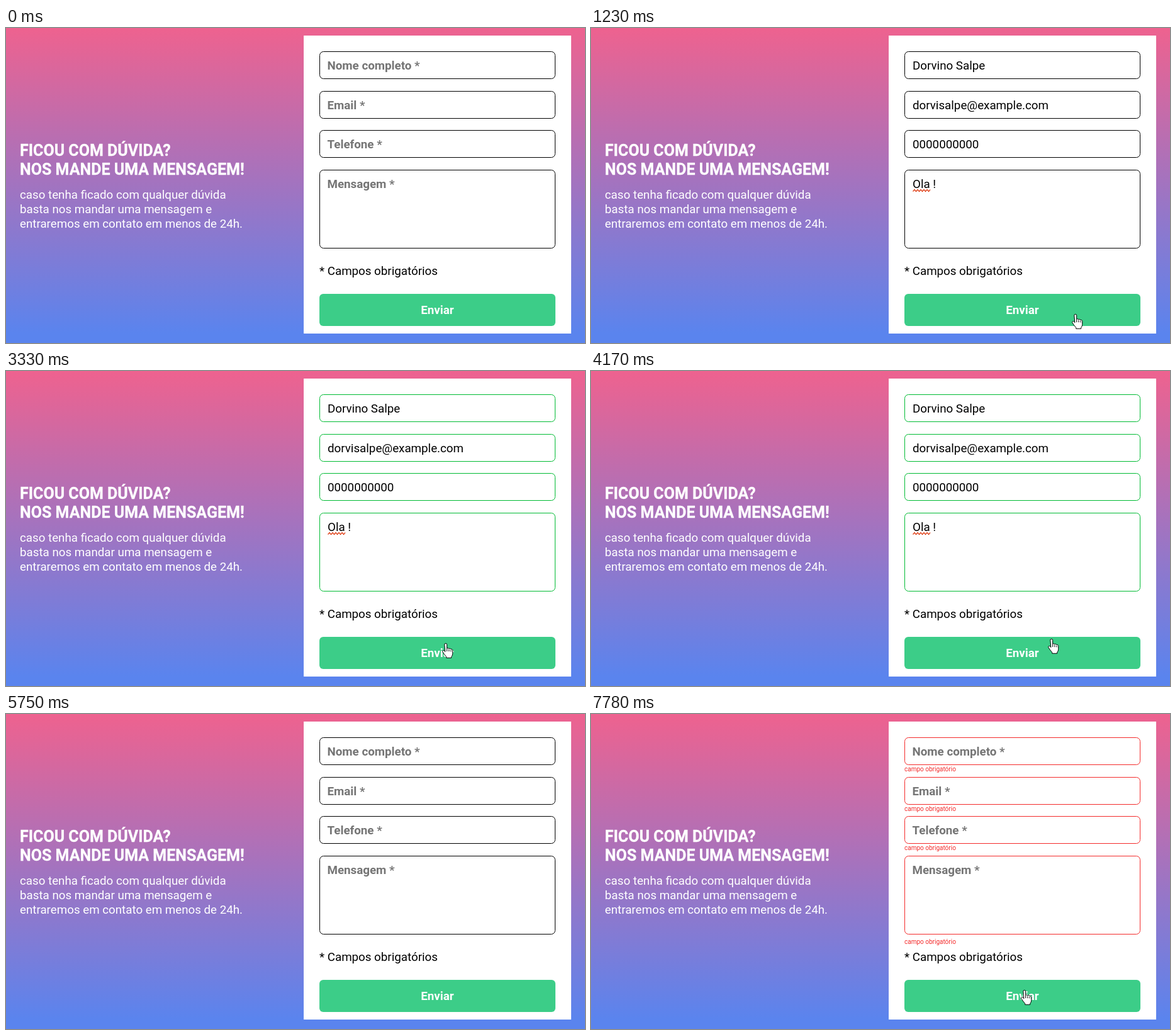
Animation of 920 by 500 pixels, one loop 8000 ms. Source, as an HTML page:

```html
<!DOCTYPE html>
<html lang="pt-BR">
<head>
<meta charset="utf-8">
<title>Formulário de contato</title>
<style>
html, body { margin: 0; width: 920px; height: 500px; overflow: hidden; }
svg { display: block; font: 18.75px Roboto, sans-serif; }
.bold { font-weight: 700; }
.title { font-size: 25px; font-weight: 700; stroke: #fff; stroke-width: .3; }
.hint { font-weight: 700; fill: #757575; }
.error { font-size: 10px; fill: #f42a2a; }
.box { fill: none; stroke: #000; }
.valid .box { stroke: #0b3; }
.invalid .box { stroke: #f42a2a; }
.value, .error { visibility: hidden; }
.filled .value, .valid .value, .invalid .error { visibility: visible; }
.filled .hint, .valid .hint { visibility: hidden; }
.cursor { fill: #fff; stroke: #000; stroke-linejoin: round; }
</style>
</head>
<body>
<svg width="920" height="500" viewBox="0 0 920 500">
  <defs>
    <linearGradient id="sky" x2="0" y2="1">
      <stop stop-color="#ee628f"/>
      <stop offset=".97" stop-color="#5a84ee"/>
    </linearGradient>
  </defs>
  <rect width="920" height="500" fill="url(#sky)"/>
  <g fill="#fff">
    <text class="title" x="22" y="203">FICOU COM DÚVIDA?</text>
    <text class="title" x="22" y="233">NOS MANDE UMA MENSAGEM!</text>
    <text x="22" y="271">caso tenha ficado com qualquer dúvida</text>
    <text x="22" y="294">basta nos mandar uma mensagem e</text>
    <text x="22" y="317">entraremos em contato em menos de 24h.</text>
  </g>
  <rect x="473" y="12" width="425" height="473" fill="#fff"/>
  <g id="form"></g>
  <text x="498" y="392">* Campos obrigatórios</text>
  <rect x="498" y="422" width="375" height="51" rx="6" fill="#3ccd88"/>
  <text class="bold" x="685.5" y="454" fill="#fff" text-anchor="middle">Enviar</text>
  <g id="pointer">
    <g id="hand" class="cursor">
      <path d="M4.8 2.5a1.9 1.9 0 0 1 3.8 0v6.2a1.8 1.8 0 0 1 3.2.6 1.8 1.8 0 0 1 3.2.8 1.7 1.7 0 0 1 2.7 1.5v5q0 3-2 5.2v1.7h-8v-1.7q-3.2-3.4-6-8a1.8 1.8 0 0 1 2.4-2l1.7 2z" transform="translate(-6 -.2)"/>
      <path d="M2.7 8.5v4.5M5.9 9.8v3.4M9 10.8v2.6" fill="none"/>
    </g>
    <path id="arrow" class="cursor" d="M.5 .5V16.5L4.3 13 6.8 18.5 9.3 17.4 6.9 12H11.5Z"/>
    <path id="beam" d="M-3.5-8.5h3l.5.5.5-.5h3M0-8V8M-3.5 8.5h3l.5-.5.5.5h3" fill="none" stroke="#000"/>
    <circle id="click" r="12" fill="#ff0" fill-opacity=".47"/>
  </g>
</svg>
<script>
const LOOP = 8000, STEP = 70, PITCH = 62.6;
const $ = id => document.getElementById(id);

function field(label, value, i, height = 44, gap = 10) {
  const y = Math.round(37 + i * PITCH);
  return `
    <rect class="box" x="498.5" y="${y + .5}" width="374" height="${height - 1}" rx="6"/>
    <text class="hint" x="510.5" y="${y + 29}">${label} *</text>
    <text class="value" x="511" y="${y + 29}">${value}</text>
    <text class="error" x="498" y="${y + height + gap}">campo obrigatório</text>`;
}

const zigzag = Array.from({ length: 12 }, (_, i) => [511.5 + i * 2.5, i % 2 ? 256.5 : 259.5]);
$('form').innerHTML =
  field('Nome completo', 'Dorvino Salpe', 0) +
  field('Email', 'dorvisalpe@example.com', 1) +
  field('Telefone', '0000000000', 2) +
  field('Mensagem', 'Ola !', 3, 125, 15) +
  `<polyline class="value" points="${zigzag}" fill="none" stroke="#e0431b" stroke-width="1.2"/>`;

function formState(t) {
  if (t < 500) return '';
  if (t < 2920) return 'filled';
  if (t < 5750) return 'valid';
  return t < 7780 ? '' : 'invalid';
}

// pointer moves: start, end and the three points of a quadratic curve
const moves = [
  { start: 960, end: 1800, curve: [[812, 478], [760, 440], [705, 443]] },
  { start: 3330, end: 4170, curve: [[698, 432], [553, 244], [731, 425]] },
  { start: 4170, end: 4740, curve: [[731, 425], [767, 455], [803, 491]] },
  { start: 5940, end: 6500, curve: [[746, 486], [720, 444], [688, 438]] }
];

// smooth start and stop, leaning towards the start
function ease(k) {
  const s = k ** .75;
  return s * s * (3 - 2 * s);
}

function place(t) {
  if (t < 960 || t >= 4810 && t < 5940) return null;
  const { start, end, curve: [a, b, c] } = moves.findLast(m => t >= m.start);
  const passed = Math.floor((t - start + 10) / STEP) * STEP;
  const k = ease(Math.min(1, passed / (end - start)));
  return a.map((p, i) => Math.round((1 - k) ** 2 * p + 2 * k * (1 - k) * b[i] + k * k * c[i]));
}

function shape(x, y) {
  if (y >= 422 && y < 473) return 'hand';
  const overText = y < 350 || x < 685 && y > 375 && y < 397;
  return overText ? 'beam' : 'arrow';
}

const show = (id, on) => $(id).style.display = on ? '' : 'none';

function draw(t) {
  $('form').setAttribute('class', formState(t));
  const spot = place(t);
  show('pointer', spot);
  if (!spot) return;
  $('pointer').setAttribute('transform', `translate(${spot})`);
  const kind = shape(...spot);
  for (const id of ['hand', 'arrow', 'beam']) show(id, id === kind);
  show('click', t >= 2860 && t < 2920 || t >= 7580 && t < 7780);
}

const begin = performance.now();
function tick() {
  draw((performance.now() - begin) % LOOP);
  requestAnimationFrame(tick);
}
tick();
</script>
</body>
</html>
```
